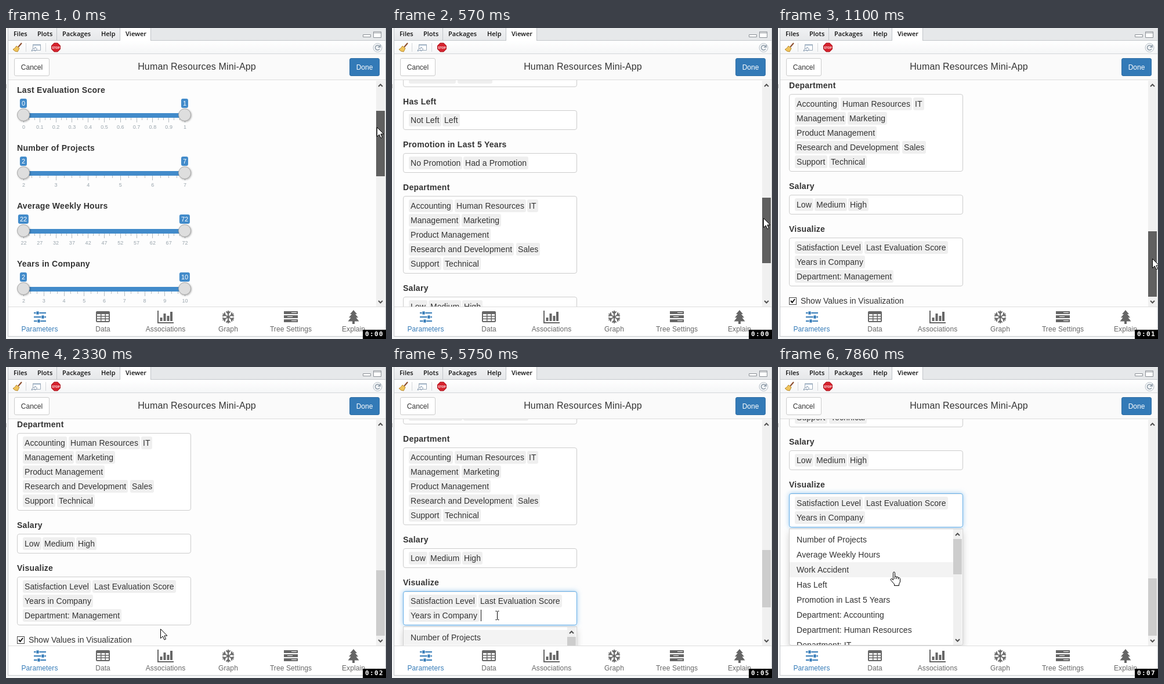
Animation, 655 px wide and 537 px high, one loop 8000 ms. Source, as an HTML page:

```html
<!DOCTYPE html>
<html lang="en">
<head>
<meta charset="utf-8">
<title>Mini-App</title>
<style>
html, body { margin: 0; width: 100%; height: 100%; overflow: hidden; }
body { background: #f6f7f8; font: 14px/20px "Liberation Sans", Arial, sans-serif; color: #333; }
div, svg, span.tag { position: absolute; box-sizing: border-box; white-space: nowrap; }
#stage { left: 0; top: 0; width: 655px; height: 537px; overflow: hidden; cursor: none; }
#pane { left: 3px; top: 0; width: 652px; height: 533px; background: #fdfdfd; border: 1px solid #c3c7cb; border-top: 0; }

#tabs { left: 4px; top: 0; width: 650px; height: 22px; background: #e6e8ea; border-bottom: 1px solid #c3c7cb; }
.tab { top: 0; height: 21px; background: linear-gradient(#f0f1f3, #e6e8ea); border: 1px solid #c0c4c8; border-width: 0 1px 0 0;
  font: 600 11px/20px "Open Sans", sans-serif; color: #111; padding-left: 9px; }
.tab.on { background: #fff; height: 22px; }
#tools { left: 4px; top: 22px; width: 650px; height: 23px; background: linear-gradient(#fff, #f5f6f7); border-bottom: 1px solid #d4d7da; }
#bar { left: 4px; top: 45px; width: 650px; height: 45px; background: #fafafa; border-bottom: 1px solid #ddd; }
#title { left: 0; width: 650px; top: 12px; text-align: center; font-size: 16px; letter-spacing: .15px; }
.btn { top: 7px; height: 31px; border: 1px solid #ccc; border-radius: 3px; background: #fff; font-size: 12px; line-height: 31px; text-align: center; }
.btn.go { background: #337ab7; border-color: #2e6da4; color: #fff; }

#view { left: 4px; top: 90px; width: 634px; height: 391px; overflow: hidden; }
#page { left: -4px; top: -90px; width: 640px; height: 1400px; letter-spacing: .07px; }
.label { left: 19px; font-weight: bold; letter-spacing: .28px; }
.box { left: 19px; width: 300px; background: #fff; border: 1px solid #ccc; border-radius: 4px; }
.box.focus { border-color: #66afe9; box-shadow: inset 0 1px 1px rgba(0,0,0,.075), 0 0 8px rgba(102,175,233,.6); }
span.tag { height: 22px; padding: 1px 3px; background: #efefef; border-radius: 3px; }
span.tag.on { background: #428bca; color: #fff; }
.line { left: 30px; width: 278px; height: 8px; background: #428bca; }
.knob { width: 22px; height: 22px; border-radius: 50%; background: #dedede; border: 1px solid #aaa; box-shadow: 1px 1px 3px rgba(0,0,0,.3); }
.value { height: 16px; padding: 0 3px; transform: translateX(-50%); background: #428bca; color: #fff; border-radius: 3px; font-size: 11px; line-height: 16px; letter-spacing: 0; }
.tick { width: 1px; background: #b3bbc1; }
.num { transform: translateX(-50%); font-size: 9px; line-height: 12px; color: #99a4ac; }
#check { left: 19px; top: 1204px; width: 13px; height: 13px; background: #fff; border: 1px solid #444; }
#checkText { left: 39px; top: 1200px; letter-spacing: 0; }
#caret { left: 153px; top: 1133px; width: 1px; height: 20px; background: #111; }
#drop { left: 19px; top: 1162px; width: 300px; height: 202px; background: #fff; border: 1px solid #d0d0d0; border-radius: 0 0 4px 4px;
  box-shadow: 0 6px 12px rgba(0,0,0,.175); }
#list { left: 0; top: 0; width: 282px; height: 200px; overflow: hidden; }
.row { left: 0; width: 282px; height: 26px; padding: 3px 12px; }
.row.on { background: #f3f3f3; }
.scroll { width: 15px; background: #f0f0f0; }
.thumb { left: 0; width: 15px; background: #cdcdcd; }

#nav { left: 4px; top: 481px; width: 650px; height: 51px; background: #fff; border-top: 1px solid #ddd; }
.item { top: 0; width: 108px; height: 50px; color: #666; text-align: center; font-size: 12px; letter-spacing: .1px; }
.item svg { left: 40px; top: 4px; }
.item div { left: 0; width: 100%; top: 28px; }
.item.on { color: #337ab7; }
#clock { left: 615px; top: 521px; width: 40px; height: 16px; background: #000; color: #fff; padding-left: 4px;
  font: bold 11px/16px "DejaVu Sans Mono", monospace; letter-spacing: 1.4px; }
</style>
</head>
<body>
<div id="stage">
  <div id="pane"></div>
  <div style="left:0;top:97px;width:1px;height:7px;background:#bbb"></div>
  <div id="tabs"></div>
  <div id="tools"></div>
  <svg width="655" height="46" fill="none">
    <path d="M615.5 11.500h13v4h-13z" fill="#fff" stroke="#8b9096"/>
    <path d="M633.500 6.500h13v10h-13zM633.500 8.500h13" fill="#fff" stroke="#8b9096"/>
    <path d="M27 26l-6 7" stroke="#8a4b2a" stroke-width="2"/>
    <path d="M18 31l5 4-3 6q-5 0-8-4 4-2 6-6z" fill="#f0c45c" stroke="#b98a2e"/>
    <path d="M34.500 26v15M68.500 26v15" stroke="#d5d8db"/>
    <path d="M46.500 28.500h13v10h-13z" fill="#fff" stroke="#9aa9b8"/>
    <path d="M47 30h12" stroke="#c4d2e0" stroke-width="2"/>
    <path d="M44 40q1-5 6-5v-2l4 3.500-4 3.500v-2q-3 0-6 2z" fill="#fff" stroke="#7f94ab"/>
    <path d="M83 26h6l4.500 4.500v6L89 41h-6l-4.500-4.500v-6z" fill="#d6232e" stroke="#a8141d"/>
    <text x="86" y="35.500" font-size="5" font-weight="bold" fill="#fff" text-anchor="middle">STOP</text>
    <circle cx="640.500" cy="34" r="7.500" fill="#f4f6f8" stroke="#b8c0c8"/>
    <path d="M644 32a4 4 0 1 0 0 4M645 29v4h-4" stroke="#8d9aa6" stroke-width="1.500"/>
  </svg>
  <div id="bar">
    <div class="btn" style="left:10px;width:61px">Cancel</div>
    <div id="title">Human Resources Mini-App</div>
    <div class="btn go" style="left:588px;width:52px">Done</div>
  </div>
  <div id="view"><div id="page">
    <div id="check"><svg width="11" height="11" fill="none" stroke="#111" stroke-width="2"><path d="M2 5l2.500 3L9 2"/></svg></div>
    <div id="checkText">Show Values in Visualization</div>
  </div></div>
  <div class="scroll" style="left:638px;top:91px;height:390px">
    <div class="thumb" id="thumb"></div>
    <svg width="15" height="390" fill="none" stroke="#505050" stroke-width="2"><path d="M4 10l3.500-3.500L11 10M4 380l3.500 3.500L11 380"/></svg>
  </div>
  <div id="nav"></div>
  <div id="clock"></div>
  <svg id="arrow" width="14" height="21"><path d="M.5.5v16l3.800-3.500 2.700 6 2.500-1.100-2.600-5.900h5z" fill="#fff" stroke="#000"/></svg>
  <svg id="beam" width="8" height="17" fill="none" stroke="#000"><path d="M.5.5h2l1 1 1-1h2M3.500 1v14M.5 15.500h2l1-1 1 1h2"/></svg>
  <svg id="hand" width="19" height="26"><path d="M5.500 14V2.500q0-1.500 1.500-1.500t1.500 1.500V9q1-1 2.800 0l.2.800q1.500-1 2.800.4l.2.600q2.500-.5 3 1.700v5.500l-2 4v2.500H7.500V22L1.500 15q-1-2 .5-2.500t3.500 2.500zM8.500 9v4M11.500 9.800V13M14.500 10.800V13.500" fill="#fff" stroke="#000"/></svg>
</div>
<script>
const $ = id => document.getElementById(id);
const page = $('page');

function add(parent, cls, style, text = '', tag = 'div') {
  const el = document.createElement(tag);
  el.className = cls;
  for (const k in style) el.style[k] = style[k] + 'px';
  el.textContent = text;
  parent.append(el);
  return el;
}

[['Files', 0, 42], ['Plots', 41, 43], ['Packages', 84, 69], ['Help', 151, 42], ['Viewer', 193, 53]]
  .forEach(([name, left, width], i) => add($('tabs'), i == 4 ? 'tab on' : 'tab', { left, width }, name));

// Range sliders: label centre y, bounds, label step, minor ticks per interval
function slider(name, y, min, max, step, minor) {
  add(page, 'label', { top: y - 10 }, name);
  add(page, 'line', { top: y + 40 });
  const count = Math.round((max - min) / step), parts = count * (minor + 1);
  for (let i = 0; i <= parts; i++) {
    const left = 30 + 278 * i / parts, major = i % (minor + 1) == 0;
    add(page, 'tick', { left: Math.round(left), top: y + 48, height: major ? 8 : 4 });
    if (major) add(page, 'num', { left: left + .5, top: y + 58 }, +(min + step * i / (minor + 1)).toFixed(1));
  }
  [[30, min], [308, max]].forEach(([x, v]) => {
    add(page, 'knob', { left: x - 11, top: y + 32 });
    add(page, 'value', { left: x, top: y + 15 }, v);
  });
}
slider('Satisfaction Level', 116, 0, 1, .1, 2);
slider('Last Evaluation Score', 216, 0, 1, .1, 2);
slider('Number of Projects', 316, 2, 7, 1, 3);
slider('Average Weekly Hours', 416, 22, 72, 5, 2);
slider('Years in Company', 516, 2, 10, 1, 2);

// Tag boxes: each line is a list of [x, text]
function tagBox(name, y, lines) {
  add(page, 'label', { top: y - 10 }, name);
  const box = add(page, 'box', { top: y + 15, height: 9 + 25 * lines.length });
  lines.forEach((line, i) => line.forEach(([x, text]) =>
    add(box, 'tag', { left: x - 20, top: 5 + 25 * i }, text, 'span')));
  return box;
}
tagBox('Work Accident', 616, [[[29, 'No Accident'], [113, 'Accident']]]);
tagBox('Has Left', 690, [[[29, 'Not Left'], [87, 'Left']]]);
tagBox('Promotion in Last 5 Years', 764, [[[29, 'No Promotion'], [123, 'Had a Promotion']]]);
tagBox('Department', 838, [
  [[29, 'Accounting'], [108, 'Human Resources'], [233, 'IT']],
  [[29, 'Management'], [120, 'Marketing']],
  [[29, 'Product Management']],
  [[29, 'Research and Development'], [214, 'Sales']],
  [[29, 'Support'], [88, 'Technical']]]);
tagBox('Salary', 1012, [[[29, 'Low'], [63, 'Medium'], [121, 'High']]]);
const visual = tagBox('Visualize', 1086, [
  [[29, 'Satisfaction Level'], [149, 'Last Evaluation Score']],
  [[29, 'Years in Company']],
  [[29, 'Department: Management']]]);
const lastTag = visual.lastChild;

const caret = add(page, '', {});
caret.id = 'caret';
const drop = add(page, '', {});
drop.id = 'drop';
const list = add(drop, '', {});
list.id = 'list';
const rows = ['Number of Projects', 'Average Weekly Hours', 'Work Accident', 'Has Left', 'Promotion in Last 5 Years',
  'Department: Accounting', 'Department: Human Resources', 'Department: IT']
  .map((text, i) => add(list, 'row', { top: 5 + 26 * i }, text));
const side = add(drop, 'scroll', { left: 282, top: 0, height: 200 });
add(side, 'thumb', { top: 17, height: 61 });
side.insertAdjacentHTML('beforeend',
  '<svg width="15" height="200" fill="none" stroke="#505050" stroke-width="2"><path d="M4 11l3.500-3.500L11 11M4 190l3.500 3.500L11 190"/></svg>');

// Navigation icons on a 28 x 26 grid
const flake = [0, 60, 120, 180, 240, 300].map(a =>
  `<path transform="rotate(${a} 14 13)" d="M14 13V2M10.500 3.500L14 7l3.500-3.500" fill="none" stroke="currentColor" stroke-width="2"/>`).join('');
const bars = [3, 10, 17].map(y => `<path d="M2 ${y}h24v5H2z"/><path d="M${y == 10 ? 8 : 15} ${y + 2}h9v1h-9z" fill="#fff"/>`).join('');
const icons = [
  ['Parameters', '<path d="M4 5h21v2H4zM4 12h21v2H4zM4 19h21v2H4z"/><path d="M8 3h5v6H8zM17 10h5v6h-5zM10 17h5v6h-5z" stroke="#fff" stroke-width=".8"/>'],
  ['Data', '<path d="M4 3h20a2 2 0 0 1 2 2v15a2 2 0 0 1-2 2H4a2 2 0 0 1-2-2V5a2 2 0 0 1 2-2z"/><path d="M4 8h6v3H4zM11.500 8h6v3h-6zM19 8h5v3h-5zM4 12.500h6v3H4zM11.500 12.500h6v3h-6zM19 12.500h5v3h-5zM4 17h6v3H4zM11.500 17h6v3h-6zM19 17h5v3h-5z" fill="#fff"/>'],
  ['Associations', '<path d="M0 2h2v20h26v2H0zM4.500 14h4v6h-4zM10.500 7h4v13h-4zM16.500 11h4v9h-4zM22 4h4v16h-4z"/>'],
  ['Graph', flake],
  ['Tree Settings', bars],
  ['Explain', '<path d="M14 1l6 7h-3l5 6h-3.500l5 6.500H16V25h-4v-4.500H4.500l5-6.500H6l5-6H8z"/>']
];
icons.forEach(([name, art], i) => {
  const item = add($('nav'), i ? 'item' : 'item on', { left: Math.round(108.1 * i + .4) });
  item.innerHTML = `<svg width="28" height="26" fill="currentColor">${art}</svg><div>${name}</div>`;
});

const bursts = [[150, 1100, 8], [1250, 1250, 1], [1810, 2570, 7], [2850, 3200, 3], [3630, 3780, 2], [4210, 4310, 2],
  [4590, 4890, 3], [5170, 5170, 1], [5750, 5750, 1], [6030, 6810, 7], [7090, 7860, 7]];
const ticks = bursts.flatMap(([a, b, n]) => Array.from({ length: n }, (_, i) => n > 1 ? a + (b - a) * i / (n - 1) : a));
const held = t => ticks.reduce((last, x) => x <= t ? x : last, 0);

const scrollKeys = [[0, 109], [150, 140], [421, 425], [557, 563], [829, 695], [964, 739], [5749, 739], [5750, 714],
  [6030, 738], [6420, 850], [6680, 883]];
const mouseKeys = [[0, 640, 172], [150, 640, 186], [557, 641, 329], [964, 645, 392], [1100, 646, 399], [1250, 644, 408],
  [2317, 267, 453], [2570, 245, 449], [2850, 241, 441], [3200, 238, 437], [3780, 155, 435], [4310, 155, 435],
  [4890, 180, 429], [5750, 181, 429], [6420, 181, 429], [6810, 178, 430], [7340, 150, 390], [7860, 199, 354]];
const seconds = [1100, 2190, 3190, 4310, 5170, 6160, 7200];

function at(keys, t, col = 1) {
  const i = keys.findIndex(k => k[0] > t);
  if (i < 0) return keys[keys.length - 1][col];
  const a = keys[i - 1], b = keys[i];
  return a[col] + (b[col] - a[col]) * (t - a[0]) / (b[0] - a[0]);
}

const show = (el, on) => { el.style.display = on ? '' : 'none'; };

function draw(now) {
  const t = held(now % 8000), open = t >= 5750;
  const scroll = Math.round(at(scrollKeys, t));
  const x = Math.round(at(mouseKeys, t)), y = Math.round(at(mouseKeys, t, 2));
  page.style.transform = `translateY(${-scroll}px)`;

  const size = open ? 99 : 113, max = open ? 883 : 739;
  $('thumb').style.top = Math.round(16 + scroll * (357 - size) / max) + 'px';
  $('thumb').style.height = size + 'px';
  $('thumb').style.background = t < 1810 ? '#606060' : '#cdcdcd';

  visual.classList.toggle('focus', t >= 4210);
  lastTag.classList.toggle('on', t >= 4210);
  show(lastTag, !open);
  visual.style.height = (open ? 59 : 84) + 'px';
  show(drop, open);
  show(caret, open && Math.floor((t - 5750) / 530) % 2 == 0);

  const row = Math.max(0, Math.floor((y - (1168 - scroll)) / 26));
  rows.forEach((el, i) => el.classList.toggle('on', i == row));

  const kind = t < 2850 ? 'arrow' : t < 3630 ? 'beam' : !open ? 'hand' : t < 6160 ? 'beam' : 'hand';
  const spot = { arrow: [1, 1], beam: [3, 8], hand: [6, 1] };
  for (const id in spot) {
    show($(id), id == kind);
    $(id).style.left = x - spot[id][0] + 'px';
    $(id).style.top = y - spot[id][1] + 'px';
  }
  $('clock').textContent = '0:0' + seconds.filter(s => s <= t + 1).length;
}

const start = performance.now();
function loop() {
  draw(performance.now() - start);
  requestAnimationFrame(loop);
}
loop();
</script>
</body>
</html>
```
